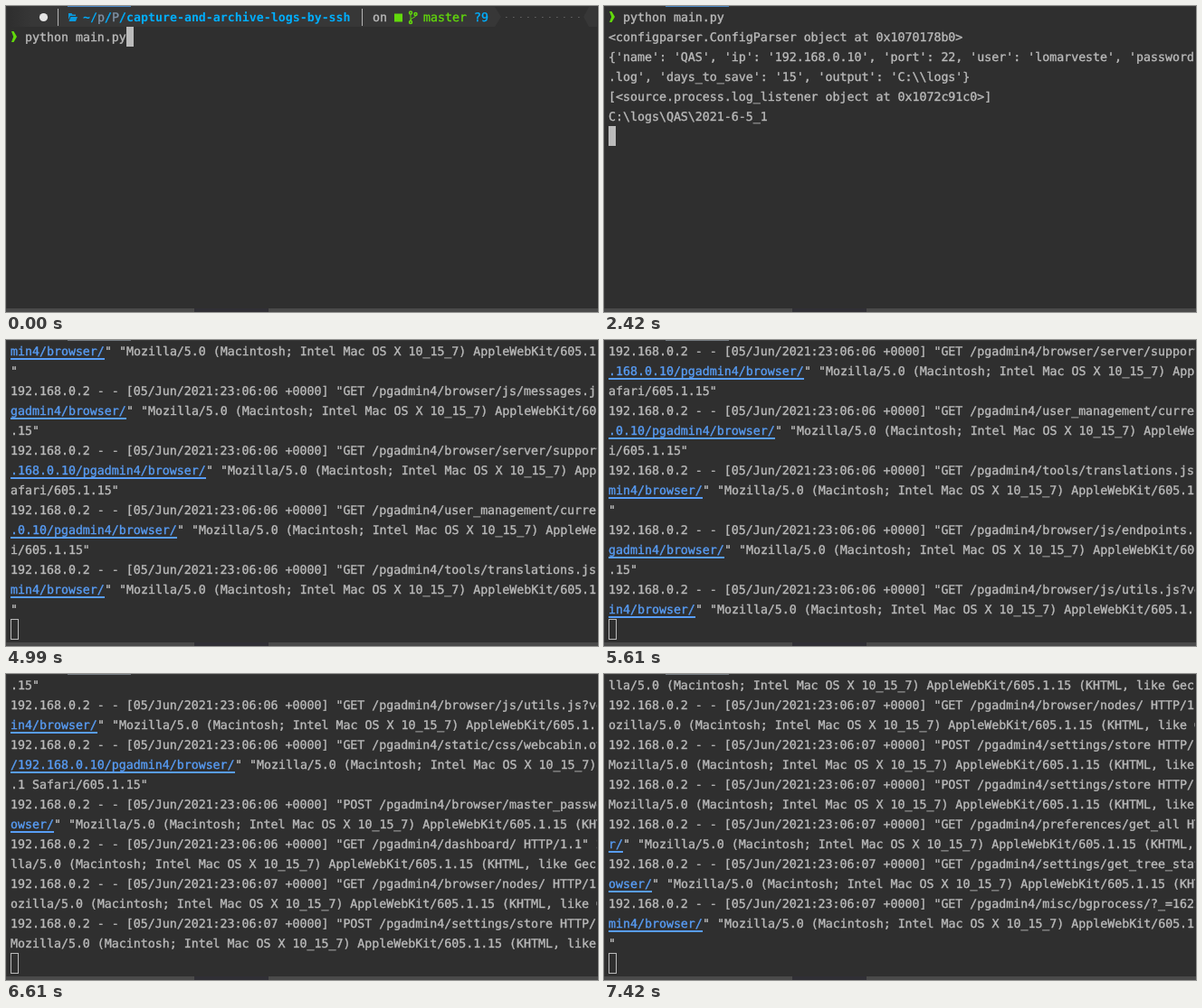
An HTML page for the animation above (8000 ms loop, 654 by 339 pixels).

```html
<!DOCTYPE html>
<html lang="en">
<head>
<meta charset="utf-8">
<title>Terminal log capture</title>
<style>
  html, body { margin: 0; width: 100%; height: 100%; overflow: hidden; background: #2f2f2f; }
  svg { display: block; width: 654px; height: 339px; }
  text {
    font: 13.288px "DejaVu Sans Mono", monospace;
    fill: #bbb; stroke: #bbb; stroke-width: .35px;
    white-space: pre; text-rendering: geometricPrecision;
  }
  .bold { font-weight: bold; stroke-width: 0; }
  .blue { fill: #00afff; stroke: #00afff; }
  .path { fill: #7f93a8; stroke: #7f93a8; }
  .green { fill: #62d80c; stroke: #62d80c; }
  .link { fill: #589df6; stroke: #589df6; }
  rect, path { stroke-width: 1px; }
  .flat { stroke: none; }
</style>
</head>
<body>
<svg viewBox="0 0 654 339">
  <defs>
    <linearGradient id="fade">
      <stop offset="0" stop-color="#2f2f2f"/><stop offset="1" stop-color="#373737"/>
    </linearGradient>
  </defs>
  <rect width="654" height="339" fill="#2f2f2f"/>

  <g id="prompt">
    <rect x="5" y="1" width="24" height="22" fill="url(#fade)"/>
    <path d="M29 1H540L547 12L540 23H29ZM654 1H644L638 12L644 23H654Z" fill="#373737"/>
    <circle cx="41.5" cy="12.5" r="4.6" fill="#e4e4e4"/>
    <path d="M57.5 3V22M393.5 3V22" stroke="#b4b4b4"/>
    <path d="M69 8H72.5L73.5 9.5H77V11H71L69 15ZM71.5 12H79L77 17H69.5Z" fill="#0a9ade"/>
    <rect x="429" y="8.5" width="9" height="9" class="green flat"/>
    <g fill="none" stroke="#62d80c" stroke-width="1.5">
      <circle cx="447" cy="7.5" r="1.5"/><circle cx="447" cy="18" r="1.5"/><circle cx="452.5" cy="9" r="1.5"/>
      <path d="M447 9V16.5M452.5 10.5C452.5 13.5 447 12.5 447 16"/>
    </g>
    <path d="M552 12.5H636" stroke="#626262" stroke-dasharray="1.6 6.4"/>
  </g>

  <g id="command">
    <path d="M6 6H8.5L12 12L8.5 18H6L8.2 12Z" class="green flat"/>
  </g>
  <g id="output"></g>
  <g id="log"></g>
  <rect id="lastRow" y="309" width="654" height="22" fill="#2f2f2f"/>

  <rect y="331" width="654" height="4" fill="#2f2f2f"/>
  <rect x="653" width="1" height="335" fill="#2f2f2f"/>
  <rect y="335" width="654" height="4" fill="#4a4a4a"/>
  <rect x="208" y="335" width="82" height="4" fill="#302f35"/>
  <rect width="654" height="1" fill="#383838"/>
  <rect width="1" height="335" fill="#383838"/>
  <rect id="tab" x="68" width="70" height="1" fill="#4a88c7"/>

  <rect id="block" width="8" height="22" fill="#bbb"/>
  <rect id="hollow" x=".5" y=".5" width="8" height="22" fill="none" stroke="#bbb"/>
</svg>
<script>
const LOOP = 8000, CELL = 8, ROW = 22, LEFT = 5, TOP = 1;
const $ = id => document.getElementById(id);

function add(parent, tag, attrs, content = '') {
  const el = document.createElementNS('http://www.w3.org/2000/svg', tag);
  for (const key in attrs) el.setAttribute(key, attrs[key]);
  el.textContent = content;
  return parent.appendChild(el);
}

function write(parent, row, col, content, cls = '') {
  const y = TOP + row * ROW + 16;
  return add(parent, 'text', { x: LEFT + col * CELL, y, class: cls }, content);
}

// A "|" ends the linked start of a line.
function writeLine(parent, row, line) {
  const [link, rest] = line.includes('|') ? line.split('|') : ['', line];
  if (link) {
    write(parent, row, 0, link, 'link');
    add(parent, 'rect', {
      x: LEFT, y: TOP + row * ROW + 19, width: link.length * CELL, height: 2, class: 'link flat'
    });
  }
  write(parent, row, link.length, rest);
}

// Each step is [time, value]; values hold until the next step.
function play(id, prop, steps) {
  const frames = steps.map(([time, value]) => ({ offset: time / LOOP, [prop]: value, easing: 'steps(1, end)' }));
  frames.push({ offset: 1, [prop]: steps[steps.length - 1][1] });
  $(id).animate(frames, { duration: LOOP, iterations: Infinity });
}
const at = (col, row) => `translate(${LEFT + col * CELL}px, ${TOP + row * ROW}px)`;
const down = rows => `translate(0px, ${rows * ROW}px)`;

[
  [10, '~/', 'bold blue'], [12, 'p', 'path'], [13, '/', 'blue'], [14, 'P', 'path'], [15, '/', 'blue'],
  [16, 'capture-and-archive-logs-by-ssh', 'bold blue'],
  [50, 'on', ''], [57, 'master', 'green'], [64, '?9', 'blue']
].forEach(([col, word, cls]) => write($('prompt'), 0, col, word, cls));

write($('command'), 0, 2, 'python main.py');

[
  '<configparser.ConfigParser object at 0x1070178b0>',
  "{'name': 'QAS', 'ip': '192.168.0.10', 'port': 22, 'user': 'lomarveste', 'password': ",
  ".log', 'days_to_save': '15', 'output': 'C:\\\\logs'}",
  '[<source.process.log_listener object at 0x1072c91c0>]',
  'C:\\logs\\QAS\\2021-6-5_1'
].forEach((line, i) => writeLine($('output'), i + 1, line));

const agent = '"Mozilla/5.0 (Macintosh; Intel Mac OS X 10_15_7) AppleWebKit/605.1.15 (KHTML, like Gecko)';
const request = (path, second = 6, verb = 'GET') =>
  `192.168.0.2 - - [05/Jun/2021:23:06:0${second} +0000] "${verb} /pgadmin4/${path} HTTP/1.1" 200`;
const referrer = link => `${link}|" ${agent}`;

const FIRST = -5;
[
  referrer('min4/browser/'),
  '"',
  request('browser/js/messages.js'),
  referrer('gadmin4/browser/'),
  '.15"',
  request('browser/server/supported_servers.js'),
  referrer('.168.0.10/pgadmin4/browser/'),
  'afari/605.1.15"',
  request('user_management/current_user.js'),
  referrer('.0.10/pgadmin4/browser/'),
  'i/605.1.15"',
  request('tools/translations.js'),
  referrer('min4/browser/'),
  '"',
  request('browser/js/endpoints.js'),
  referrer('gadmin4/browser/'),
  '.15"',
  request('browser/js/utils.js?ver=50200'),
  referrer('in4/browser/'),
  request('static/css/webcabin.overrides.css'),
  referrer('/192.168.0.10/pgadmin4/browser/'),
  '.1 Safari/605.1.15"',
  request('browser/master_password', 6, 'POST'),
  referrer('owser/'),
  request('dashboard/'),
  agent.slice(5),
  request('browser/nodes/', 7),
  agent.slice(2),
  request('settings/store', 7, 'POST'),
  agent.slice(1),
  request('settings/store', 7, 'POST'),
  agent.slice(1),
  request('preferences/get_all', 7),
  referrer('r/'),
  request('settings/get_tree_state/', 7),
  referrer('owser/'),
  request('misc/bgprocess/?_=1622934367', 7),
  referrer('min4/browser/'),
  '"'
].forEach((line, i) => writeLine($('log'), FIRST + i, line));

play('prompt', 'opacity', [[0, 1], [190, 0]]);
play('command', 'transform', [[0, down(1)], [190, down(0)]]);
play('command', 'opacity', [[0, 1], [4990, 0]]);
play('output', 'opacity', [[0, 0], [860, 1], [4990, 0]]);

play('log', 'opacity', [[0, 0], [4990, 1]]);
play('log', 'transform', [
  [0, 5], [5190, 2], [5610, 0], [5710, -3], [5860, -5], [5990, -7],
  [6420, -8], [6610, -11], [6710, -13], [6860, -17], [6990, -20]
].map(([time, rows]) => [time, down(rows)]));
play('lastRow', 'opacity', [[0, 0], [4990, 1], [6420, 0], [6610, 1]]);

play('block', 'transform', [[0, at(16, 1)], [190, at(0, 1)], [860, at(0, 6)]]);
play('block', 'opacity', [
  [0, 1], [710, 0], [860, 1], [1860, 0], [2420, 1], [2990, 0], [3420, 1], [3990, 0]
]);
play('hollow', 'transform', [[0, at(0, 6)], [4990, at(0, 14)]]);
play('hollow', 'opacity', [[0, 0], [4340, 1], [6420, 0], [6610, 1]]);
play('tab', 'fill', [[0, '#4a88c7'], [4340, '#747a80']]);
</script>
</body>
</html>
```
